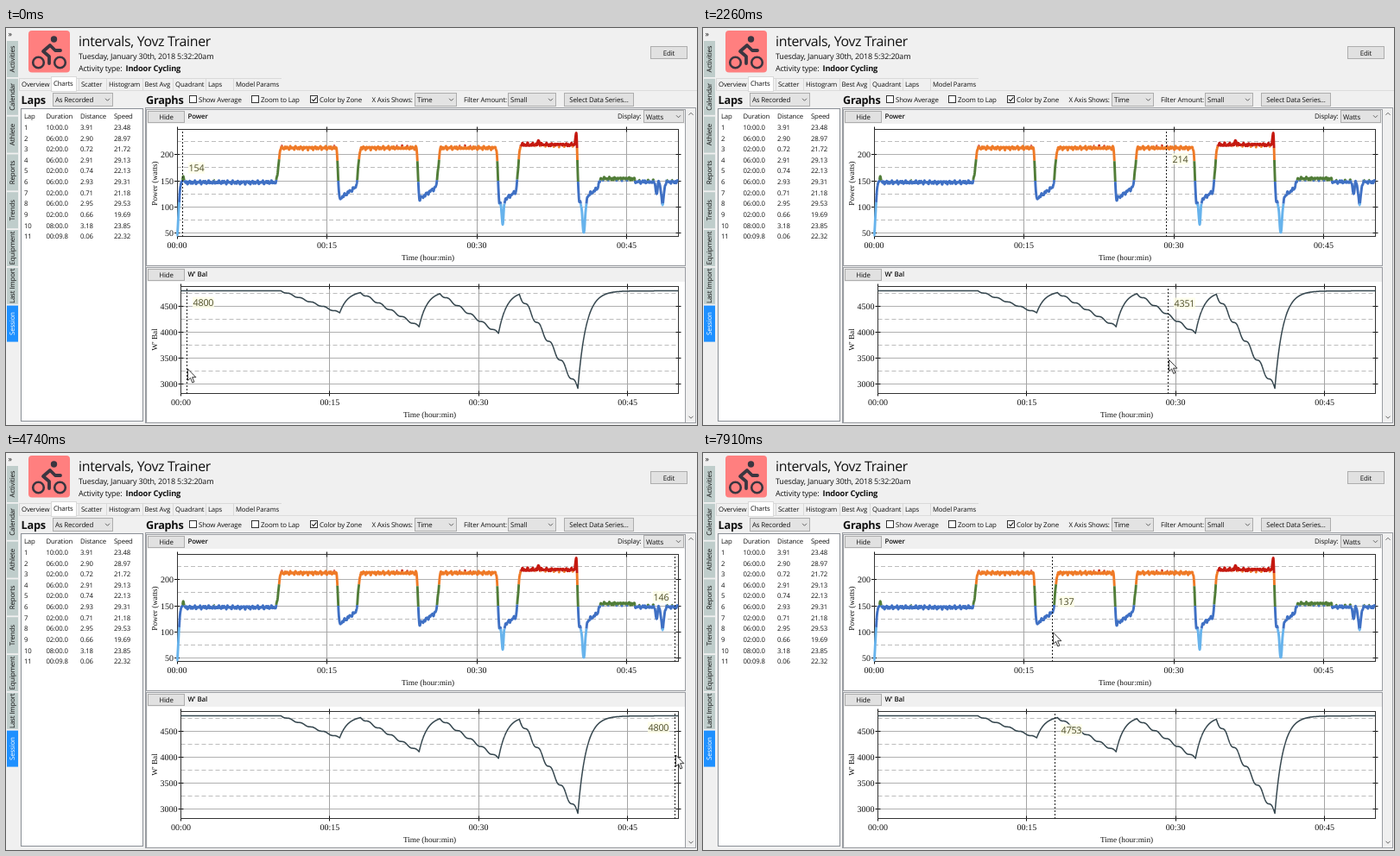
An HTML page that plays this animation: 800 by 460 pixels, repeating every 8 s.

```html
<!DOCTYPE html>
<html lang="en">
<head>
<meta charset="utf-8">
<title>Session charts</title>
<style>
html, body { margin: 0; width: 100%; height: 100%; overflow: hidden; background: #f0f0f0; }
svg { display: block; width: 800px; height: 460px; }
text { font-family: "Open Sans", sans-serif; font-size: 7.9px; letter-spacing: -.02em; fill: #111; text-rendering: geometricPrecision; white-space: pre; }
.axis { font-family: "Liberation Serif", serif; letter-spacing: 0; }
.value { font-size: 10.8px; fill: #4a4a28; }
</style>
</head>
<body>
<svg id="stage" viewBox="0 0 800 460"></svg>
<script>
const stage = document.getElementById('stage');
const lerp = (a, b, u) => a + (b - a) * u;
const smooth = u => { u = Math.min(1, Math.max(0, u)); return u * u * (3 - 2 * u); };
const snap = v => Math.floor(v) + .5;
const out = [];

const rect = (x, y, w, h, fill, stroke = 'none', more = '') =>
  out.push(`<rect x="${x}" y="${y}" width="${w}" height="${h}" fill="${fill}" stroke="${stroke}" ${more}/>`);
const path = (d, stroke, width = 1, more = '') =>
  out.push(`<path d="${d}" fill="none" stroke="${stroke}" stroke-width="${width}" ${more}/>`);
const text = (x, y, str, style = '', more = '') =>
  out.push(`<text x="${x}" y="${y}" style="${style}" ${more}>${str}</text>`);
const axisText = (x, y, str, size, anchor = 'middle', more = '') =>
  text(x, y, str, `font-size:${size}px`, `class="axis" text-anchor="${anchor}" ${more}`);
const button = (x, y, w, h, label) => {
  rect(x + .5, y + .5, w - 1, h - 1, '#e1e1e1', '#adadad');
  text(x + w / 2, y + h / 2 + 3, label, '', 'text-anchor="middle"');
};
const chevron = (x, y, dir) =>
  path(`M${x - 2.5} ${y - dir * 1.25}l2.5 ${dir * 2.5}l2.5 ${-dir * 2.5}`, '#555', .9);
const select = (x, y, w, h, label) => {
  rect(x + .5, y + .5, w - 1, h - 1, '#e3e3e3', '#adadad');
  text(x + 3, y + h / 2 + 3, label);
  chevron(x + w - 6.5, y + h / 2, 1);
};
const checkbox = (x, label, checked) => {
  rect(x + .5, 78.5, 8, 8, '#fff', '#333');
  if (checked) path(`M${x + 2} 82.5l2 2.2l3.4 -4.4`, '#222', 1.1);
  text(x + 11, 86, label);
};

// The workout: a warm-up, four efforts of 6 min with 2 min rests, a cool-down.
const spentAfter = [425, 695, 825, 1890];
const restWatts = [125.5, 125, 116.5, 120];
const efforts = spentAfter.map((spent, i) => ({ begin: 8 * i + 10.1, end: 8 * i + 16, spent }));
const laps = [{ start: 0, watts: 147 }];
restWatts.forEach((watts, i) => laps.push(
  { start: 8 * i + 10, watts: i < 3 ? 213 : 219 },
  { start: 8 * i + 16, watts, climb: 14 }));
laps.push({ start: 42.1, watts: 154 }, { start: 45.7, watts: 148 });

// Short surges and dips: minute, watts, width.
const swings = [[0, -98, .22], [.6, 11, .1], [32.6, -46, .12], [36.2, 8, .1], [39.95, 22, .1],
  [40.72, -64, .2], [48, -24, .12], [48.6, -43, .18]];

const ripple = t => [[13, 1.5], [23, 1.5], [37, 1.2]]
  .reduce((sum, [rate, size]) => sum + size * Math.cos(rate * (t - 22.53)), 0);

function power(t) {
  const level = lap => lap.watts + (lap.climb || 0) * (t - lap.start - 1);
  let watts = laps[0].watts;
  laps.slice(1).forEach((lap, i) => {
    const [from, to] = lap.watts > laps[i].watts ? [-.12, .42] : [-.05, .28];
    watts = lerp(watts, level(lap), smooth((t - lap.start - from) / (to - from)));
  });
  for (const [at, size, width] of swings) watts += size * Math.exp(-(((t - at) / width) ** 2));
  return watts + ripple(t);
}

// Energy left: spent in small stairs during an effort, recovering exponentially after it.
function balance(t) {
  const FULL = 4800, RECOVERY = .82, STAIRS = 10 * Math.PI;
  let spent = 0, since = 0;
  const remaining = at => spent * Math.exp(-(at - since) / RECOVERY);
  for (const e of efforts) {
    if (t < e.begin) break;
    if (t < e.end) {
      const u = (t - e.begin) / (e.end - e.begin);
      return FULL - lerp(remaining(e.begin), e.spent, u + .9 * Math.sin(STAIRS * u) / STAIRS);
    }
    spent = e.spent;
    since = e.end;
  }
  return FULL - remaining(t);
}

const RIGHT = 778.5;
const powerChart = {
  left: 198, top: 117.5, bottom: 241.5, perMin: 11.567, fn: power,
  y: v => 267.6 - .604 * v, base: 50, step: 25, name: 'Power (watts)', nameY: 180, titleX: 488.5
};
const balanceChart = {
  left: 202.5, top: 299.5, bottom: 423.5, perMin: 11.49, fn: balance,
  y: v => 591.2 - .0597 * v, base: 3000, step: 250, name: "W' Bal", nameY: 361, titleX: 490.5
};

function drawAxes(c) {
  for (let i = 0; i < 8; i++) {
    const value = c.base + i * c.step, y = snap(c.y(value));
    if (i % 2) {
      path(`M${c.left} ${y}H${RIGHT}`, '#bdbdbd', 1, 'stroke-dasharray="5 3"');
      continue;
    }
    path(`M${c.left} ${y}H${RIGHT}`, '#b0b0b0');
    path(`M${c.left - 3} ${y}h6M${RIGHT - 3} ${y}h6`, '#111');
    axisText(c.left - 4, y + 3.3, value, 10, 'end');
  }
  for (let min = 0; min < 50; min += 15) {
    const x = c.left + min * c.perMin;
    if (min) path(`M${snap(x)} ${c.top}V${c.bottom}`, '#a4a4a4');
    path(`M${snap(x)} ${c.top - 3}v6m0 ${c.bottom - c.top - 6}v6`, '#111');
    axisText(x, c.bottom + 13.5, `00:${String(min).padStart(2, '0')}`, 10);
  }
  rect(snap(c.left), c.top, RIGHT - snap(c.left), c.bottom - c.top, 'none', '#333');
  axisText(c.titleX, c.bottom + 27.2, 'Time (hour:min)', 9.2);
  axisText(0, 0, c.name, 9.2, 'middle', `transform="translate(174.5 ${c.nameY}) rotate(-90)"`);
}

const zones = [[106, '#67b3ec'], [151, '#3f70c4'], [190, '#517d38'], [216.5, '#ef7a27'], [999, '#c5180f']];
const zoneColor = watts => zones.find(([limit]) => watts < limit)[1];

function drawCurve(c, colorOf, width) {
  const runs = [];
  for (let x = c.left; x <= RIGHT; x += .1) {
    const value = c.fn((x - c.left) / c.perMin), color = colorOf(value);
    const point = `${x.toFixed(1)} ${c.y(value).toFixed(1)}`;
    const last = runs[runs.length - 1];
    if (last) last.d += 'L' + point;
    if (!last || last.color !== color) runs.push({ color, d: 'M' + point });
  }
  for (const run of runs) path(run.d, run.color, width, 'stroke-linejoin="round"');
}

function drawHeader() {
  text(2.5, 10, '»', 'font-size:9px');
  ['Activities', 'Calendar', 'Athlete', 'Reports', 'Trends', 'Equipment', 'Last Import', 'Session'].forEach((name, i) => {
    const active = name === 'Session', y = 15 + i * 43.8;
    rect(1, y, 13, 42, active ? '#1e90ff' : '#bfcdcb');
    text(0, 0, name, active ? 'fill:#fff' : '', `text-anchor="middle" transform="translate(10.3 ${y + 21}) rotate(-90)"`);
  });

  rect(26, 3, 48, 48.5, '#ff7f7f', 'none', 'rx="4"');
  const ink = '#3a3640';
  for (const x of [37.5, 62.5])
    out.push(`<circle cx="${x}" cy="40" r="6.3" fill="none" stroke="${ink}" stroke-width="2.6"/>`);
  out.push(`<circle cx="55.5" cy="13" r="3.7" fill="${ink}"/>`);
  path('M50 41V33L43 27L51 20L57 26H63', ink, 3.8, 'stroke-linejoin="round" stroke-linecap="round"');

  text(84, 21, 'intervals, Yovz Trainer', 'font-size:15.9px');
  text(84, 36, 'Tuesday, January 30th, 2018 5:32:20am', 'font-size:9px');
  text(84, 50, 'Activity type:', 'font-size:9px');
  text(138.5, 50, 'Indoor Cycling', 'font-size:9.3px;font-weight:700');
  button(746, 21, 43, 15, 'Edit');

  path('M15 72.5H800', '#dcdcdc');
  path('M15 58.5H319', '#d9d9d9');
  rect(52.5, 56.5, 29, 17, '#fff', '#d9d9d9');
  Object.entries({ Overview: 18, Charts: 55, Scatter: 87, Histogram: 119, 'Best Avg': 160.5,
    Quadrant: 196, Laps: 234, 'Model Params': 266 }).forEach(([name, x]) => {
    path(`M${snap(x - 2.5)} 58V72`, '#d9d9d9');
    text(x, name === 'Charts' ? 67 : 68, name, 'font-size:7.75px');
  });
}

function drawLaps() {
  text(17.5, 88, 'Laps', 'font-size:12.8px;font-weight:700');
  select(54, 75, 70, 16, 'As Recorded');
  rect(17.5, 93.5, 141, 362, '#fff', '#8a8f96');
  const rows = ['Lap Duration Distance Speed', '1 10:00.0 3.91 23.48', '2 06:00.0 2.90 28.97', '3 02:00.0 0.72 21.72',
    '4 06:00.0 2.91 29.13', '5 02:00.0 0.74 22.13', '6 06:00.0 2.93 29.31', '7 02:00.0 0.71 21.18',
    '8 06:00.0 2.95 29.53', '9 02:00.0 0.66 19.69', '10 08:00.0 3.18 23.85', '11 00:09.8 0.06 22.32'];
  rows.forEach((row, r) => row.split(' ').forEach((cell, c) =>
    text([21, 46.5, 86, 125][c], 105.3 + r * 12.62, cell, 'font-size:7.75px')));
}

function drawGraphs() {
  text(162, 88, 'Graphs', 'font-size:12.7px;font-weight:700');
  checkbox(212, 'Show Average');
  checkbox(284, 'Zoom to Lap');
  checkbox(352, 'Color by Zone', true);
  text(423.5, 86, 'X Axis Shows:');
  select(473, 75, 49, 16, 'Time');
  text(530, 86, 'Filter Amount:');
  select(581, 75, 56, 16, 'Small');
  button(646, 75, 81, 16, 'Select Data Series...');

  rect(161.5, 92.5, 637, 365, '#f0f0f0', '#9a9da2');
  chevron(793, 99.5, -1);
  chevron(793, 451, 1);
  for (const [y, h, name] of [[94, 181, 'Power'], [277, 180, "W' Bal"]]) {
    rect(162.5, y + .5, 624, h, '#f0f0f0', '#9a9da2');
    rect(164, y + 17, 622, h - 18, '#fff');
    button(164, y + 2, 43, 14, 'Hide');
    text(210.5, y + 11.3, name, 'font-size:7.9px;font-weight:600');
  }
  text(708, 105.2, 'Display:');
  select(738, 95, 47, 15, 'Watts');
  drawAxes(powerChart);
  drawCurve(powerChart, zoneColor, 2.9);
  drawAxes(balanceChart);
  drawCurve(balanceChart, () => '#36474f', 1.5);
}

drawHeader();
drawLaps();
drawGraphs();
for (const id of ['power', 'balance'])
  out.push(`<g id="${id}"><path fill="none" stroke="#222" stroke-dasharray="2 2"/>
    <rect height="13" fill="#ffffe6" fill-opacity=".75"/><text class="value"></text></g>`);
out.push('<path id="cursor" d="M0 0V13.4L3.1 10.5L5.3 16L7.4 15.1L5.1 9.7H9.4Z" fill="#fff" stroke="#222" stroke-width=".9"/>');
stage.innerHTML = out.join('');

function showValue(chart, id, minute) {
  const [line, box, label] = document.getElementById(id).children;
  const x = Math.min(RIGHT, snap(chart.left + minute * chart.perMin));
  const amount = chart.fn(minute), y = chart.y(amount);
  const value = String(Math.round(amount));
  const width = value.length * 6;
  const labelX = x + 7 + width > RIGHT ? x - 7 - width : x + 7;
  const labelY = y + (y - chart.top < 24 ? 13.5 : -12.5);
  line.setAttribute('d', `M${x} ${chart.top + 2.5}V${chart.bottom}`);
  box.setAttribute('x', labelX - .5);
  box.setAttribute('y', labelY - 6.5);
  box.setAttribute('width', width + 1);
  label.setAttribute('x', labelX);
  label.setAttribute('y', labelY + 3.9);
  label.textContent = value;
  return x;
}

// Pointer track: step, minute on the time axis, height on the stage.
const LOOP = 8000, STEPS = 103;
const track = [
  [0, .57, 395], [22, 24.7, 387], [33, 31.9, 383], [39, 33.8, 381], [43, 34.05, 380], [52, 42.43, 364],
  [61, 49.8, 350], [65, 49.8, 350], [74, 37.26, 216], [75, 37.2, 216], [86, 24.22, 191], [102, 17.81, 208]
];

function render(ms) {
  const step = Math.min(STEPS - 1, Math.floor((ms + 14) * STEPS / LOOP));
  const i = track.findIndex(key => key[0] >= step) || 1;
  const [a, b] = [track[i - 1], track[i]];
  const u = (step - a[0]) / (b[0] - a[0]);
  const minute = lerp(a[1], b[1], u), y = lerp(a[2], b[2], u);
  const upper = showValue(powerChart, 'power', minute);
  const lower = showValue(balanceChart, 'balance', minute);
  document.getElementById('cursor').setAttribute('transform', `translate(${(y > 280 ? lower : upper) + 1} ${y})`);
}

const start = performance.now();
function tick() {
  render((performance.now() - start) % LOOP);
  requestAnimationFrame(tick);
}
tick();
</script>
</body>
</html>
```
